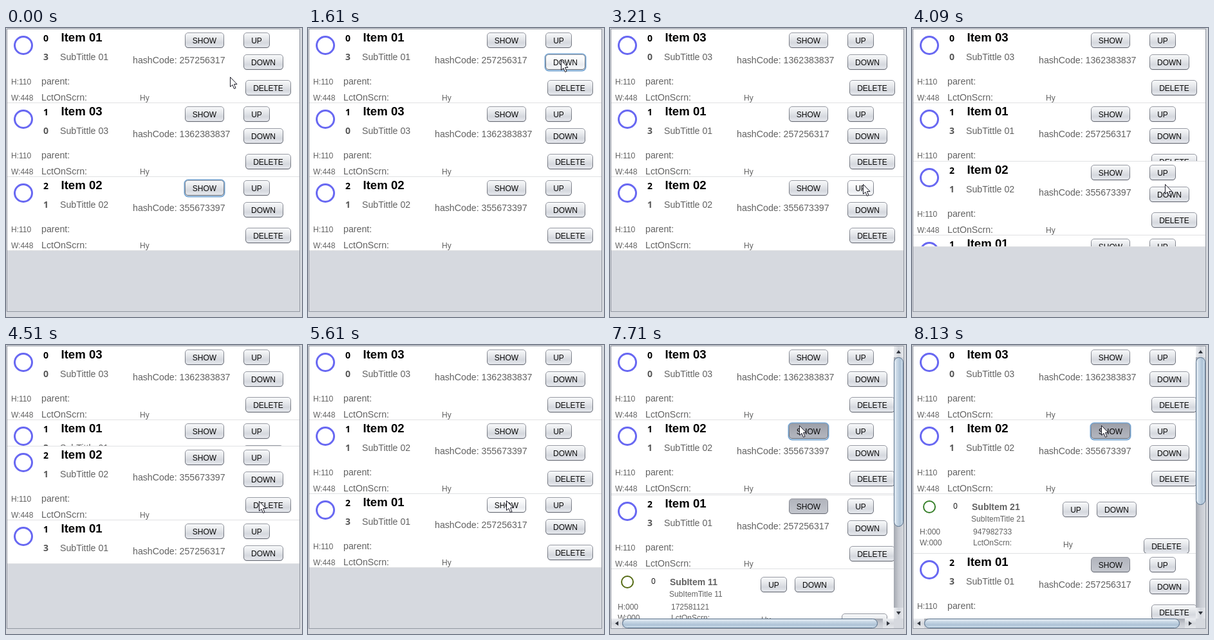
Recreate the animation shown at these times as an HTML page with a canvas. Size 460 px wide and 450 px high, loop 8730 ms.

```html
<!DOCTYPE html>
<html lang="en">
<head>
<meta charset="utf-8">
<title>Sortable item list</title>
<style>
html, body { margin: 0; width: 100%; height: 100%; overflow: hidden; background: #d6d9df; }
canvas { display: block; }
</style>
</head>
<body>
<canvas id="stage" width="460" height="450"></canvas>
<script>
const ctx = document.getElementById('stage').getContext('2d');
const LOOP = 8730, STEP = 70, ROW = 115, SUB = 93;
const SANS = '"Liberation Sans", Arial, sans-serif';
const GRAY = '#626262';

const one = { n: '01', id: 3, hash: 257256317, sub: { n: 11, hash: 172581121, color: '#556b14' } };
const two = { n: '02', id: 1, hash: 355673397, sub: { n: 21, hash: 947982733, color: '#37802a' } };
const three = { n: '03', id: 0, hash: 1362383837 };

// The picture advances in 70 ms steps, counted from the start of each action.
const actions = [0, 260, 1000, 1410, 2240, 2310, 2790, 3810, 4720, 5610, 6070, 7010, 7580, 7710];

// Pointer path: time, x, y
const path = [
  [190, 348, 76], [470, 399, 67], [930, 399, 67], [1140, 393, 50], [1690, 393, 50],
  [2240, 358, 301], [2590, 353, 346], [2720, 353, 346], [3070, 364, 270], [3210, 393, 243],
  [4930, 393, 243], [5540, 312, 211], [5610, 308, 242], [6940, 308, 242], [7430, 294, 125]
];

// Keyboard focus: time from which a button (label + item) owns it
const focusLog = [
  [0, 'SHOW02'], [1410, 'DOWN01'], [1632, ''], [3810, 'UP02'], [3943, ''],
  [6070, 'SHOW01'], [7580, 'SHOW02']
];

let pointer, focus, pressed, canHover;

const last = (list, test) => list.filter(test).pop();
const progress = (t, start, span) => Math.min(1, Math.max(0, (t - start) / span));

function snap(t) {
  const start = last(actions, a => a <= t);
  return start + Math.floor((t - start) / STEP) * STEP;
}

function pointerAt(t) {
  const i = path.findIndex(k => k[0] > t);
  if (i < 1) return (i ? path[path.length - 1] : path[0]).slice(1);
  const [a, b] = [path[i - 1], path[i]];
  const p = progress(t, a[0], b[0] - a[0]);
  return [1, 2].map(k => Math.round(a[k] + (b[k] - a[k]) * p));
}

function gradient(x0, y0, x1, y1, ...colors) {
  const g = ctx.createLinearGradient(x0, y0, x1, y1);
  colors.forEach((c, i) => g.addColorStop(i / (colors.length - 1), c));
  return g;
}

function text(s, x, y, font = `12px ${SANS}`, color = GRAY) {
  ctx.font = font;
  ctx.fillStyle = color;
  ctx.fillText(s, x, y);
}

function box(x, y, w, h, r) {
  ctx.beginPath();
  ctx.roundRect(x, y, w, h, r);
}

function ring(x, y, r, width, color) {
  ctx.beginPath();
  ctx.arc(x, y, r, 0, 7);
  ctx.lineWidth = width;
  ctx.strokeStyle = color;
  ctx.stroke();
}

function button(label, x, y, w, key = '') {
  const name = label + key;
  const focused = key && focus === name;
  const over = canHover && pointer[0] >= x && pointer[0] < x + w && pointer[1] >= y && pointer[1] < y + 25;
  let fill = ['#fafbfc', '#e9ebee', '#d5d8de', '#e9ebf0'];
  if (over) fill = ['#ffffff', '#f8f9fa', '#e9ebef', '#fbfcfd'];
  if (pressed.includes(name)) fill = focused ? ['#9c9fa8', '#a9acb5', '#b4b7c0'] : ['#b0b3bb', '#babdc5', '#c4c7ce'];

  if (focused) {
    box(x - .5, y - .5, w + 1, 26, 5.5);
    ctx.lineWidth = 2;
    ctx.strokeStyle = '#76a5d2';
    ctx.stroke();
  } else {
    box(x + .5, y + 1.5, w - 1, 23, 4.5);
    ctx.fillStyle = 'rgba(120,125,140,.35)';
    ctx.fill();
  }
  box(x + .5, y + .5, w - 1, 23, 4.5);
  ctx.fillStyle = gradient(0, y, 0, y + 24, ...fill);
  ctx.fill();
  ctx.lineWidth = 1;
  ctx.strokeStyle = gradient(0, y, 0, y + 24, '#979aa3', '#656972');
  ctx.stroke();
  ctx.textAlign = 'center';
  text(label, x + w / 2, y + 17, undefined, '#0a0a0a');
  ctx.textAlign = 'left';
}

function drawItem({ n, id, hash }, index, y) {
  const body = `14.2px ${SANS}`, digit = '700 14px "Open Sans", sans-serif';
  ring(27, y + 25, 13.5, 3, '#6868f2');
  text(index, 58, y + 19, digit, '#000');
  text(id, 58, y + 48, digit, '#585858');
  text('Item ' + n, 85.5, y + 19, `bold 18.6px ${SANS}`, '#000');
  text('SubTittle ' + n, 84, y + 48, body);
  text('hashCode: ' + hash, 197, y + 53, body);
  text('H:110', 8, y + 86);
  text('W:448', 8, y + 111);
  text('parent:', 55, y + 86, body);
  text('LctOnScrn:', 55, y + 111, body);
  text('Hy', 208, y + 111);
  button('SHOW', 278, y + 5, 61, n);
  button('UP', 369, y + 5, 41, n);
  button('DOWN', 369, y + 39, 62, n);
  button('DELETE', 372, y + 79, 71, n);
}

function drawSub({ n, hash, color }, index, y) {
  ring(27, y + 20, 9, 2, color);
  text(index, 64, y + 23, '12px "Open Sans", sans-serif', '#111');
  text('SubItem ' + n, 93, y + 25, `bold 14px ${SANS}`);
  text('SubItemTitle ' + n, 92, y + 43);
  text('H:000', 12, y + 63);
  text('W:000', 12, y + 80);
  text(hash, 95, y + 63);
  text('LctOnScrn:', 95, y + 80);
  text('Hy', 235, y + 83);
  button('UP', 234, y + 12, 41);
  button('DOWN', 287, y + 12, 62);
  button('DELETE', 360, y + 69, 71);
}

// Rows from top to bottom: painter, data, index, height
function rowsAt(t) {
  const item = (data, index, h = ROW) => [drawItem, data, index, h];
  const swap = start => {
    const h = Math.round(ROW * progress(t, start, 958));
    return [h, Math.max(0, ROW - 6 - h)];
  };
  if (t < 1632) return [item(one, 0), item(three, 1), item(two, 2)];
  if (t < 2590) {
    const [grown, left] = swap(1632);
    return [item(three, 1, grown), item(one, 0), item(three, 1, left), item(two, 2)];
  }
  if (t < 3943) return [item(three, 0), item(one, 1), item(two, 2)];
  if (t < 4901) {
    const [grown, left] = swap(3943);
    return [item(three, 0), item(one, 1, left), item(two, 2), item(one, 1, grown)];
  }
  const open = (start, full) => Math.round(full * progress(t, start, 430));
  return [
    item(three, 0), item(two, 1), [drawSub, two.sub, 0, open(7700, SUB)],
    item(one, 2), [drawSub, one.sub, 0, open(6120, 3 * SUB)]
  ];
}

function drawRow([paint, data, index, h], y) {
  if (!h) return;
  ctx.save();
  ctx.beginPath();
  ctx.rect(2, y, 454, h);
  ctx.clip();
  ctx.fillStyle = '#fff';
  ctx.fillRect(2, y, 454, h);
  paint(data, index, y);
  ctx.fillStyle = '#e0e1e3';
  ctx.fillRect(2, y + h - 1, 454, 1);
  ctx.restore();
}

// Drawn lying down; the vertical bar uses a transposed transform.
function scrollbar(length, thumb) {
  ctx.fillStyle = gradient(0, 0, 0, 15, '#a4a8b0', '#c6c9d0', '#d6d9df');
  ctx.fillRect(0, 0, length, 15);
  for (const [x, tip, base] of [[0, 6, 11], [length - 17, 11, 6]]) {
    ctx.fillStyle = gradient(0, 0, 0, 15, '#eceef1', '#d3d6dc', '#e6e8ec');
    ctx.fillRect(x, 0, 17, 15);
    ctx.beginPath();
    ctx.moveTo(x + tip, 7.5);
    ctx.lineTo(x + base, 4);
    ctx.lineTo(x + base, 11);
    ctx.fillStyle = '#30343c';
    ctx.fill();
  }
  box(17.5, .5, thumb, 14, 7);
  ctx.fillStyle = gradient(0, 0, 0, 15, '#eef4f9', '#c9d8e6', '#adc2d6', '#d9e8f4');
  ctx.fill();
  ctx.lineWidth = 1;
  ctx.strokeStyle = '#526b86';
  ctx.stroke();
}

function drawPointer([x, y]) {
  ctx.save();
  ctx.translate(x + .5, y + .5);
  ctx.beginPath();
  for (const p of [[0, 0], [0, 15], [3.5, 12], [6, 18], [8.5, 17], [6, 11], [10.5, 11]]) ctx.lineTo(...p);
  ctx.closePath();
  ctx.fillStyle = '#fff';
  ctx.fill();
  ctx.lineWidth = 1;
  ctx.strokeStyle = '#1c1c28';
  ctx.stroke();
  ctx.restore();
}

function draw(t) {
  pointer = pointerAt(t);
  focus = last(focusLog, f => f[0] <= t)[1];
  pressed = [];
  if (t >= 1410 && t < 1550) pressed.push('DOWN01');
  if (t >= 3810 && t < 3940) pressed.push('UP02');
  if (t >= 6070) pressed.push('SHOW01');
  if (t >= 7580) pressed.push('SHOW02');
  canHover = !(t >= 1632 && t < 2590 || t >= 3943 && t < 4901);

  ctx.fillStyle = '#d6d9df';
  ctx.fillRect(0, 0, 460, 450);
  const rows = rowsAt(t);
  const total = rows.reduce((sum, row) => sum + row[3], 0);
  const bars = total > 439;

  ctx.save();
  ctx.beginPath();
  ctx.rect(2, 2, bars ? 439 : 454, bars ? 424 : 439);
  ctx.clip();
  let y = 2;
  for (const row of rows) {
    drawRow(row, y);
    y += row[3];
  }
  ctx.restore();

  if (bars) {
    ctx.setTransform(1, 0, 0, 1, 2, 426);
    scrollbar(439, 396);
    ctx.setTransform(0, 1, 1, 0, 441, 2);
    scrollbar(424, Math.round(388 * 424 / total));
    ctx.resetTransform();
  }
  ctx.lineWidth = 1;
  ctx.strokeStyle = '#9297a1';
  ctx.strokeRect(1.5, 1.5, 455, 440);
  drawPointer(pointer);
}

const begin = performance.now();
function tick() {
  draw(snap((performance.now() - begin) % LOOP));
  requestAnimationFrame(tick);
}
tick();
</script>
</body>
</html>
```
